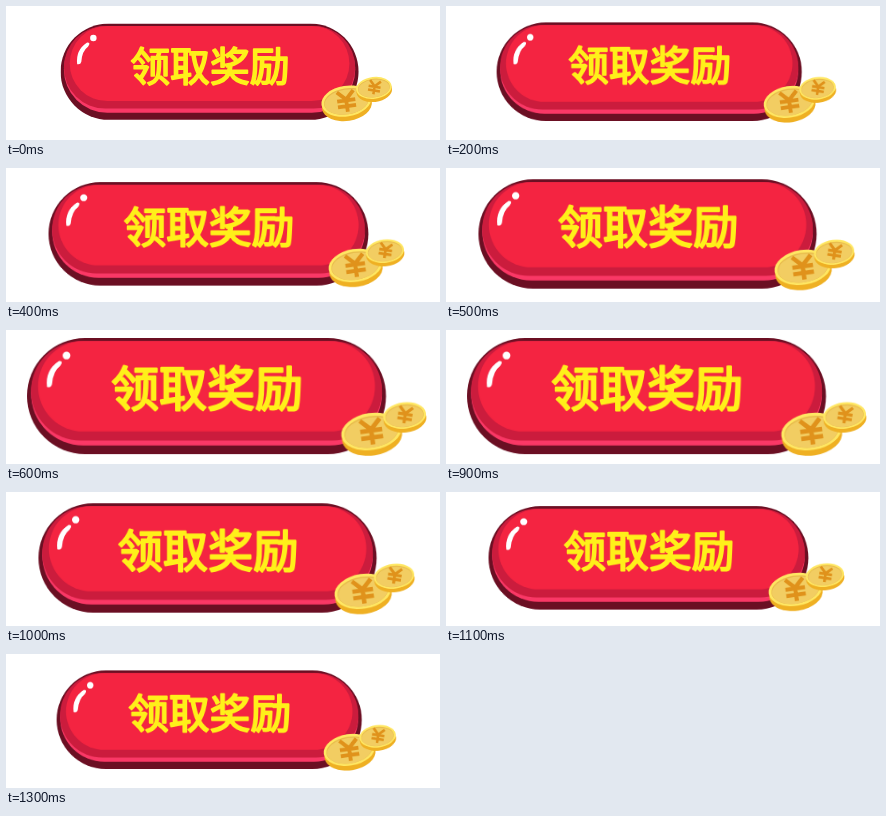
An HTML page for the animation above (1400 ms loop, 434 by 134 pixels).

```html
<!DOCTYPE html>
<html lang="zh-CN">
<head>
<meta charset="utf-8">
<title>领取奖励</title>
<style>
  html, body { margin: 0; width: 100%; height: 100%; overflow: hidden; background: #fff; }
  svg { display: block; width: 434px; height: 134px; }
  #button { transform-origin: 218.5px 64px; }
  text {
    font: 500 48px "Noto Sans CJK SC", "Noto Sans CJK", sans-serif;
    fill: #fff01a; stroke: #fff01a; stroke-width: 2.2; stroke-linejoin: round;
  }
  #yen { fill: none; stroke: #e0921b; stroke-width: 4.6; }
</style>
</head>
<body>
<svg viewBox="0 0 434 134">
  <defs>
    <g id="coin">
      <ellipse cy="5" rx="30.3" ry="19" fill="#efb023"/>
      <ellipse rx="30.3" ry="18.5" fill="#ffe763"/>
      <ellipse cy=".3" rx="27.2" ry="15.8" fill="#e8bb4c"/>
      <ellipse cy="1" rx="26.6" ry="15" fill="#f2cd62"/>
    </g>
    <path id="yen" d="M-10-12 0-2 10-12M0-2V13M-11-1H11M-11 6H11"/>
  </defs>
  <g id="button">
    <rect x="21" y="8" width="359" height="116" rx="58" fill="#6b0f23"/>
    <rect x="25" y="11" width="351" height="104.5" rx="52.2" fill="#fa3866"/>
    <rect x="25" y="11" width="351" height="99.5" rx="49.7" fill="#cb1c3d"/>
    <rect x="32" y="11" width="337" height="90.5" rx="45.2" fill="#f42441"/>
    <path d="M41 57Q39 40 53 31Q58 31 54 36Q47 41 46 54Q45 58 41 57" fill="#fff"/>
    <circle cx="60.5" cy="25.5" r="3.9" fill="#fff"/>
    <text x="105" y="76.8">领取奖励</text>
    <g transform="translate(365.3 101.5)">
      <use href="#coin" transform="rotate(-9)"/>
      <use href="#yen" transform="rotate(-8)"/>
    </g>
    <g transform="translate(398.5 85.5) scale(.71)">
      <use href="#coin" transform="rotate(-7)"/>
      <use href="#yen" transform="translate(1 -1) rotate(9) scale(.93)"/>
    </g>
  </g>
</svg>
<script>
  const LOOP = 1400;
  const sizes = [.83, .85, .869, .891, .942, 1, 1.068];
  // Grow one size per 100 ms, hold at the largest, then shrink back.
  const steps = [
    [0, 0], [200, 1], [300, 2], [400, 3], [500, 4], [600, 5], [700, 6],
    [900, 5], [1000, 4], [1100, 3], [1200, 2], [1300, 1], [LOOP, 0]
  ];
  const frames = steps.map(([time, size]) => ({
    offset: time / LOOP,
    transform: `scale(${sizes[size]})`,
    easing: 'step-end'
  }));
  document.getElementById('button').animate(frames, { duration: LOOP, iterations: Infinity });
</script>
</body>
</html>
```
